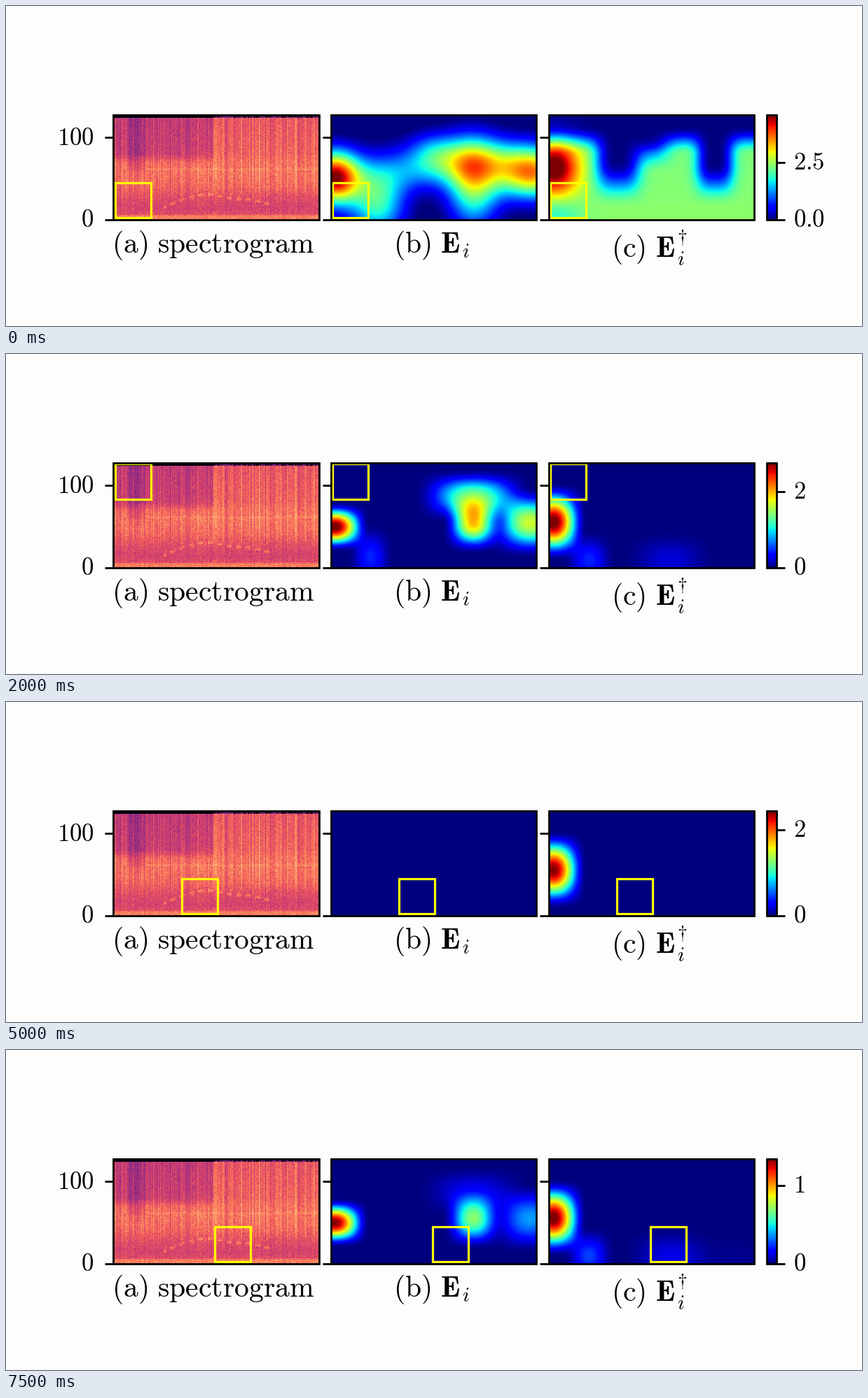
Write a matplotlib script that moves like this. It is 1222 px wide and 458 px high and loops after 8 s.

```python
import numpy as np
import matplotlib.pyplot as plt
from matplotlib.animation import FuncAnimation
from matplotlib.patches import Rectangle

plt.rcParams["mathtext.fontset"] = "cm"

W, H = 1222, 458
TOP, BOTTOM, PANEL_W = 156.0, 306.3, 293.2
LEFTS = (153.3, 464.0, 774.7)
BAR = (1086.0, 1100.3)
BINS, STEPS = 128, 249
LINE = 2.0

X, Y = np.meshgrid(np.linspace(0, PANEL_W, STEPS), np.linspace(0, BOTTOM - TOP, BINS))


def smooth(v, start, end):
    u = np.clip((v - start) / (end - start), 0, 1)
    return u * u * (3 - 2 * u)


def gauss(x, y, sx, sy):
    return np.exp(-((X - x) / sx) ** 2 / 2 - ((Y - y) / sy) ** 2 / 2)


def lobe(x, y, rx, ry):
    """Separable raised cosine that vanishes rx, ry away from its centre."""
    def side(d, r):
        return np.cos(np.clip(d / r, -1, 1) * np.pi / 2) ** 2
    return side(X - x, rx) * side(Y - y, ry)


def energy(core, heart=0, crown=0, edge=0, tail=0):
    total = (core * lobe(5, 92, 50, 36) + heart * lobe(203, 86, 45, 46)
             + crown * lobe(203, 48, 86, 40) + edge * lobe(284, 86, 64, 52)
             + tail * lobe(56, 135, 34, 50))
    return np.clip(total, 0, 1)


def energy_dagger(core, tail=0, mid=0, band=0):
    total = (core * lobe(6, 85, 48, 57) + tail * lobe(57, 140, 38, 45)
             + mid * lobe(172, 140, 70, 45) + band * lobe(250, 150, 110, 48))
    return np.clip(total, 0, 1)


def first_energy():
    total = (1.03 * gauss(4, 90, 26, 26) + 0.47 * gauss(66, 125, 28, 36)
             + 0.15 * gauss(105, 85, 45, 20) + 0.44 * gauss(195, 66, 60, 24)
             + 0.15 * gauss(145, 52, 24, 20) + 0.53 * gauss(203, 100, 26, 42)
             + 0.74 * gauss(288, 84, 36, 26))
    return np.clip(total - 0.05, 0, 1)


def first_dagger():
    """A green plateau cut by notches from above, with a hot spot at the left."""
    def notch(x, r, start, end):
        return 1 - np.exp(-np.abs((X - x) / r) ** 3) * (1 - smooth(Y, start, end))
    plateau = (0.49 + 0.03 * Y / 150) * smooth(Y, 16, 58)
    plateau = plateau * notch(98, 32, 66, 134) * notch(237, 27, 70, 132) * notch(135, 36, 25, 85)
    return np.clip(plateau + 0.55 * gauss(8, 76, 24, 28) - 0.13 * gauss(10, 142, 24, 18), 0, 1)


def spectrogram():
    rng = np.random.default_rng(4)
    t, f = np.meshgrid(np.arange(STEPS), np.arange(BINS))
    late = t >= 121
    s = np.interp(f, [0, 4, 7, 14, 28, 40, 58, 72, 80, 127],
                  [0.74, 0.72, 0.60, 0.57, 0.61, 0.67, 0.70, 0.68, 0.65, 0.62])
    s = s - 0.10 * ~late * smooth(f, 66, 80)
    s = s - 0.08 * smooth(t, 12, 22) * (1 - smooth(t, 34, 42)) * smooth(f, 48, 66)
    s = s + 0.03 * (np.abs(f - 61) < 2) * (t > 40)
    streak = rng.normal(0, 0.035, STEPS) + 0.05 * (rng.random(STEPS) > 0.88)
    s = s + streak * np.clip(f / 45, 0.3, 1)
    s = s + 0.05 * late * (t % 11 < 2) * (f > 30)
    arc = np.interp(t, [60, 85, 112, 140, 170, 195], [14, 25, 31, 26, 23, 17])
    s = s + 0.10 * (np.abs(f - arc) < 1.6) * (t > 60) * (t < 195) * (np.sin(t * 0.55) > -0.1)
    s = s + rng.normal(0, 0.035, s.shape)
    ragged = 124 + late * rng.integers(0, 4, STEPS)
    s[f >= ragged] = 0.02
    s[(f >= 124) & (f < ragged)] = 0.35
    return np.clip(s, 0, 1)


NONE = np.zeros_like(X)
E0, D0 = first_energy(), first_dagger()
E2, D2 = energy(1.03, 0.74, 0.50, 0.60, 0.15), energy_dagger(1.03, 0.25, 0.22, 0.10)

# colour limit, E, E-dagger; the window climbs five rows, then moves one column
SCENES = [
    (4.57, E0, D0),
    (4.20, 0.6 * E0 + 0.4 * E2, 0.6 * D0 + 0.4 * D2),
    (2.54, E2, D2),
    (2.66, energy(1.03, 0.73, 0.50, 0.60, 0.15), energy_dagger(1.03, 0.20, 0.14, 0.04)),
    (2.75, energy(1.03, 0.72, 0.50, 0.60, 0.16), energy_dagger(1.03, 0.16, 0.08)),
    (2.60, NONE, energy_dagger(1.02, 0.06)),
    (1.00, NONE, NONE),
    (1.00, NONE, NONE),
    (0.80, energy(1), NONE),
    (1.70, energy(1, 0.35, 0.05, 0.20), energy_dagger(0.90, 0.08)),
    (2.44, NONE, energy_dagger(1)),
    (1.00, NONE, NONE),
    (0.499, energy(1), NONE),
    (1.10, energy(1, 0.35, 0.05, 0.20), energy_dagger(0.75, 0.10)),
    (1.30, energy(1, 0.47, 0.10, 0.25), energy_dagger(0.95, 0.16, 0.06)),
    (1.34, energy(1, 0.52, 0.11, 0.28), energy_dagger(1.02, 0.19, 0.09, 0.02)),
]

fig = plt.figure(figsize=(W / 100, H / 100), dpi=100, facecolor="#fdfdfc")
ax = fig.add_axes([0, 0, 1, 1])
ax.axis("off")


def picture(data, x0, x1, cmap, interpolation):
    return ax.imshow(data, extent=(x0, x1, BOTTOM, TOP), cmap=cmap, vmin=0, vmax=1,
                     interpolation=interpolation, aspect="auto")


def frame(x0, x1):
    ax.add_patch(Rectangle((x0, TOP), x1 - x0, BOTTOM - TOP, fill=False,
                           ec="black", lw=LINE, zorder=4))


def tick(x, y):
    return ax.plot([x, x + 12], [y, y], color="black", lw=LINE, zorder=4,
                   solid_capstyle="butt")[0]


def label(x, y, s, size=25, **kw):
    return ax.text(x, y, s, fontsize=size, color="black", **kw)


def roman(s):
    return rf"$\mathrm{{{s}}}$"


picture(spectrogram()[::-1], LEFTS[0], LEFTS[0] + PANEL_W, "magma", "nearest")
maps = [picture(NONE, x, x + PANEL_W, "jet", "bilinear") for x in LEFTS[1:]]
picture(np.linspace(1, 0, 256)[:, None], *BAR, "jet", "bilinear")

windows = []
for x in LEFTS:
    frame(x, x + PANEL_W)
    for y in (BOTTOM, 188.4):
        tick(x - 12.5, y)
    windows.append(ax.add_patch(Rectangle((x, TOP), 51, 50.5, fill=False,
                                          ec="#ffff00", lw=2.3, zorder=3)))
frame(*BAR)

label(125.3, 188.8, roman("100"), ha="right", va="center")
label(125.3, BOTTOM, roman("0"), ha="right", va="center")
label(151, 353, roman(r"(a)\ spectrogram"), 30)
label(553.3, 353, r"$\mathrm{(b)\ }\mathbf{E}$", 30)
label(651, 359.5, "$i$", 21)
label(864.3, 359, r"$\mathrm{(c)\ }\mathbf{E}$", 30)
label(957.5, 371, "$i$", 21)
label(958.5, 339, r"$\dagger$", 20)

bar_ticks = [tick(BAR[1], BOTTOM) for _ in range(3)]
bar_labels = [label(1123.5, BOTTOM, "", ha="left", va="center") for _ in range(3)]

ax.set_xlim(0, W)
ax.set_ylim(H, 0)


def set_scale(limit):
    step = min(s for s in (0.25, 0.5, 1, 2, 2.5) if s >= limit / 2)
    digits = len(f"{step:g}".partition(".")[2])
    for k, (mark, text) in enumerate(zip(bar_ticks, bar_labels)):
        value = k * step
        y = BOTTOM - (BOTTOM - TOP) * value / limit
        shown = value <= limit
        mark.set_visible(shown)
        text.set_visible(shown)
        mark.set_ydata([y, y])
        text.set_y(y)
        text.set_text(roman(f"{value:.{digits}f}"))


def update(i):
    limit, e, dagger = SCENES[i]
    col, row = divmod(i, 5)
    for x, window in zip(LEFTS, windows):
        window.set_xy((x + 2.3 + 47.5 * col, 252.6 - 23.8 * row))
    maps[0].set_data(e)
    maps[1].set_data(dagger)
    set_scale(limit)
    return [*windows, *maps, *bar_ticks, *bar_labels]


anim = FuncAnimation(fig, update, frames=len(SCENES), interval=500, repeat=True,
                     repeat_delay=0, blit=False)
plt.show()
```
